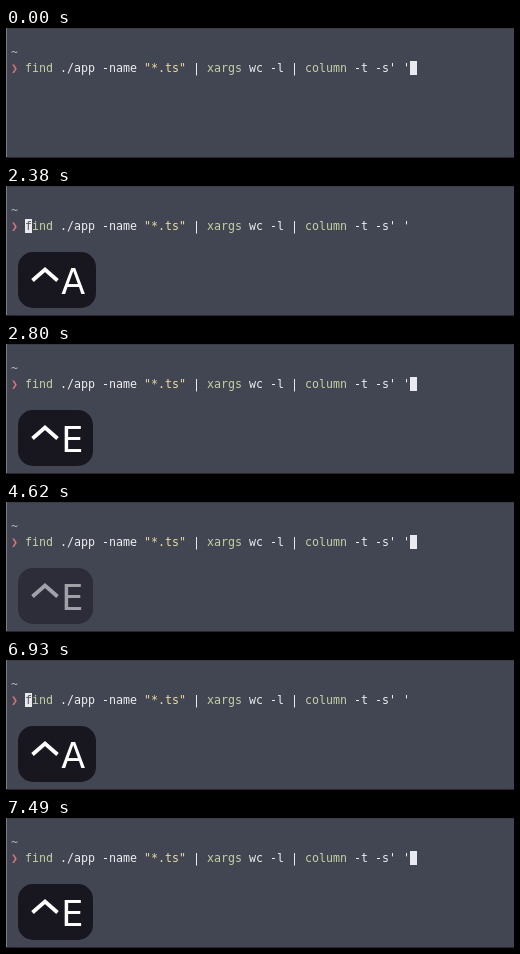
Recreate the animation shown at these times as an HTML page. Size 508 by 130 pixels, loop 9.45 s.

```html
<!DOCTYPE html>
<html lang="en">
<head>
<meta charset="utf-8">
<title>Jump to line start and end</title>
<style>
  html, body { margin: 0; width: 100%; height: 100%; overflow: hidden; background: #424552; }
  svg { display: block; width: 508px; height: 130px; }
  .term { font: 11.63px "DejaVu Sans Mono", monospace; fill: #eeeef0; white-space: pre; }
  .cmd { fill: #c5d0a5; }
  .str { fill: #ebdba2; }
  .key { font: 35px "DejaVu Sans", sans-serif; fill: #fff; }
</style>
</head>
<body>
<svg viewBox="0 0 508 130">
  <rect width="508" height="130" fill="#424552"/>
  <path d="M0 .5H508" stroke="#3a3c48"/>
  <path d="M.5 0V130" stroke="#7c7d80"/>
  <path d="M0 129.5H508" stroke="#30232f"/>

  <text class="term" x="5" y="28" style="fill:#b4b8c0">~</text>
  <text class="term" x="5" y="44" style="fill:#d9757b">❯</text>
  <text class="term" x="19" y="44"><tspan class="cmd">find</tspan> ./app -name <tspan class="str">"*.ts"</tspan> | <tspan class="cmd">xargs</tspan> wc -l | <tspan class="cmd">column</tspan> -t -s' '</text>

  <rect id="cursor" y="33" width="7" height="14" fill="#e9eaf0"/>
  <text id="under" class="term" x="19" y="44" style="fill:#555a58">f</text>

  <g id="badge">
    <rect id="plate" x="12" y="66" height="56" rx="15" fill="#18171f"/>
    <path d="M26.5 94.5 39 83.5 51.5 94.5" fill="none" stroke="#fff" stroke-width="3.8"/>
    <text id="letter" class="key" x="55.3" y="107.5"></text>
  </g>
</svg>
<script>
  const LOOP = 9450, STEP = 70, FADE = 280;
  // Each key press: when it lands, when its badge starts to fade, when it is gone
  const presses = [
    { key: "", at: 0, fade: 0, gone: 0 },
    { key: "A", at: 560, fade: 2520, gone: 2730 },
    { key: "E", at: 2800, fade: 4620, gone: 4760 },
    { key: "A", at: 4970, fade: 6930, gone: 7210 },
    { key: "E", at: 7490, fade: LOOP, gone: LOOP },
  ];
  const [cursor, under, badge, plate, letter] =
    ["cursor", "under", "badge", "plate", "letter"].map(id => document.getElementById(id));
  const start = performance.now();

  function draw(now) {
    const time = Math.max(0, now - start) % LOOP;
    const t = Math.floor(time / STEP) * STEP;
    const p = presses.findLast(press => press.at <= t);
    const home = p.key === "A";

    cursor.setAttribute("x", home ? 19 : 404);
    under.setAttribute("visibility", home ? "visible" : "hidden");
    plate.setAttribute("width", home ? 78 : 75);
    letter.textContent = p.key;
    badge.setAttribute("opacity", t < p.fade ? 1 : Math.max(0, (p.gone - t) / FADE));
    requestAnimationFrame(draw);
  }
  draw(start);
</script>
</body>
</html>
```
